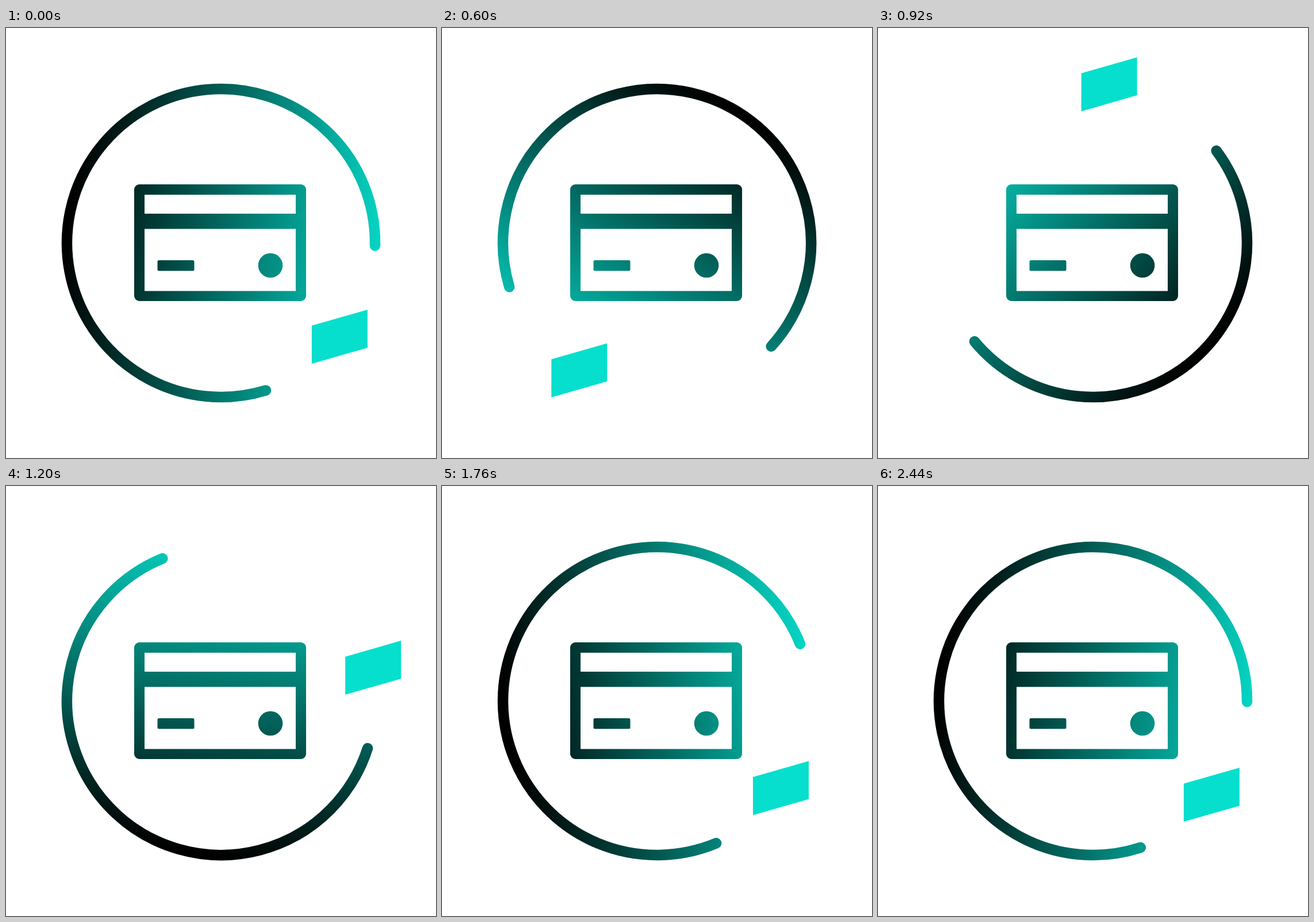
Recreate the animation shown at these times as an HTML page. Size 748x748 px, loop 2.48 s.

```html
<!DOCTYPE html>
<html lang="en">
<head>
<meta charset="utf-8">
<title>Card payment loop</title>
<style>
  html, body { margin: 0; width: 100%; height: 100%; overflow: hidden; background: #fff; }
  svg { display: block; width: 100%; height: 100%; }
</style>
</head>
<body>
<svg viewBox="0 0 748 748">
  <defs>
    <linearGradient id="ink" gradientUnits="userSpaceOnUse">
      <stop offset="0" stop-color="#000"/>
      <stop offset="1" stop-color="#06dfcd"/>
    </linearGradient>
  </defs>
  <path id="ring" fill="none" stroke="url(#ink)" stroke-width="18.5" stroke-linecap="round"/>
  <g fill="url(#ink)">
    <path fill-rule="evenodd" d="M232 272H513a9 9 0 0 1 9 9V466a9 9 0 0 1-9 9H232a9 9 0 0 1-9-9V281a9 9 0 0 1 9-9Z
      M241 290V323H504V290Z M241 349.5V457.5H504V349.5Z"/>
    <rect x="263.5" y="404" width="64" height="18.5" rx="2.5"/>
    <circle cx="460" cy="413" r="21.3"/>
  </g>
  <path id="chip" fill="#06dfcd" d="M-48.5-19.2L48.5-47V19.2L-48.5 47Z"/>
</svg>
<script>
const LOOP = 2480, STEP = 40, C = 374, R = 268;
const ring = document.getElementById('ring');
const chip = document.getElementById('chip');
const ink = document.getElementById('ink');

// Ease with control points (a, 0) and (b, 1)
function ease(x, a, b) {
  if (x <= 0) return 0;
  if (x >= 1) return 1;
  let lo = 0, hi = 1;
  for (let i = 0; i < 30; i++) {
    const u = (lo + hi) / 2, v = 1 - u;
    if (3 * v * v * u * a + 3 * v * u * u * b + u * u * u < x) lo = u; else hi = u;
  }
  return lo * lo * (3 - 2 * lo);
}

// Monotone cubic curve through [time, value] pairs
function curve(pts) {
  const n = pts.length - 1;
  const rate = i => (pts[i + 1][1] - pts[i][1]) / (pts[i + 1][0] - pts[i][0]);
  const slope = pts.map((_, i) => {
    if (i === 0 || i === n) return 0;
    const p = rate(i - 1), q = rate(i);
    return p * q <= 0 ? 0 : 2 * p * q / (p + q);
  });
  return t => {
    if (t >= pts[n][0]) return pts[n][1];
    let i = 0;
    while (t >= pts[i + 1][0]) i++;
    const h = pts[i + 1][0] - pts[i][0], s = (t - pts[i][0]) / h, r = 1 - s;
    return pts[i][1] * r * r * (1 + 2 * s) + pts[i + 1][1] * s * s * (3 - 2 * s)
      + h * s * r * (slope[i] * r - slope[i + 1] * s);
  };
}

const lead = curve([[0, 33.1], [400, 33.5], [600, 42.9], [920, 47.4], [1200, 28.3], [1760, 30.5], [2240, 32]]);
const dark = curve([[0, 185], [400, 222], [600, 302], [920, 402], [1200, 460], [1760, 542], [2240, 545]]);
const light = curve([[0, 10], [400, 42], [600, 122], [920, 222], [1200, 280], [1760, 340], [2440, 370]]);

function polar(deg, r, cx = C, cy = C) {
  const a = deg * Math.PI / 180;
  return [cx + r * Math.cos(a), cy + r * Math.sin(a)];
}

function draw(t) {
  const pos = 40 + 360 * ease(t / 2000, .521, .21);
  const from = pos + lead(t);
  const to = 361 + 359.3 * ease(t / 2440, .537, .238);
  const big = to - from > 180 ? 1 : 0;
  ring.setAttribute('d', `M${polar(from, R)}A${R} ${R} 0 ${big} 1 ${polar(to, R)}`);
  chip.setAttribute('transform', `translate(${polar(pos, 268.1, 375, 364.6)})`);
  const [x1, y1] = polar(dark(t), R), [x2, y2] = polar(light(t), 300);
  Object.entries({ x1, y1, x2, y2 }).forEach(([k, v]) => ink.setAttribute(k, v));
}

const start = performance.now();
function tick() {
  const t = (performance.now() - start) % LOOP;
  draw(Math.floor(t / STEP) * STEP);
  requestAnimationFrame(tick);
}
tick();
</script>
</body>
</html>
```
